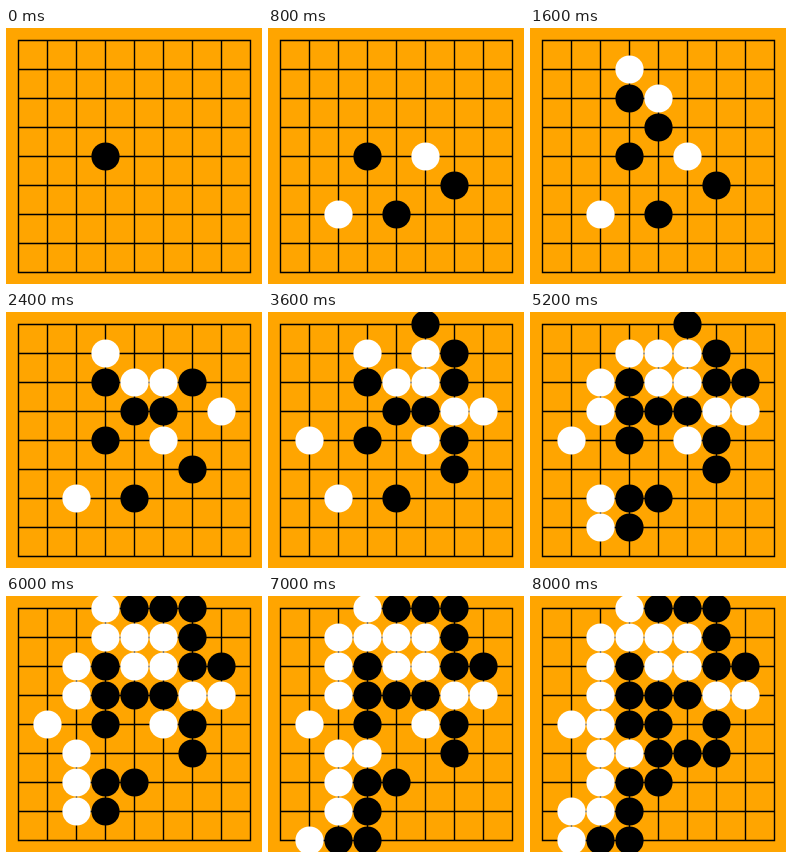
Write an HTML page with a canvas that moves like this. It is 256x256 px and loops after 8200 ms.

```html
<!DOCTYPE html>
<html lang="en">
<head>
<meta charset="utf-8">
<title>Go game</title>
<style>
  html, body { margin: 0; width: 100%; height: 100%; overflow: hidden; background: #ffa500; }
  canvas { display: block; }
</style>
</head>
<body>
<canvas id="board" width="256" height="256"></canvas>
<script>
const ctx = document.getElementById('board').getContext('2d');
const SIZE = 9, CELL = 29, EDGE = 12.5, STEP = 200;
const LINE = 1.4, RADIUS = 14.1;

// The game record: column then row of each move, black first.
const moves = ('34 54 46 26 65 42 32 31 43 52 53 73 62 63 64 51 61 14 50 41 72 ' +
  '22 33 23 36 27 37 25 40 30 60 21 28 18 38 35 45 24 44 17 55').split(' ');

const at = n => EDGE + CELL * n;
const onBoard = n => n >= 0 && n < SIZE;

function neighbours(point) {
  const [x, y] = [...point].map(Number);
  return [[x + 1, y], [x - 1, y], [x, y + 1], [x, y - 1]]
    .filter(p => p.every(onBoard)).map(p => p.join(''));
}

// Removes the group at a point if it has no free neighbour left.
function capture(stones, start) {
  const color = stones.get(start);
  const group = new Set([start]);
  for (const point of group) {
    for (const next of neighbours(point)) {
      if (!stones.has(next)) return;
      if (stones.get(next) === color) group.add(next);
    }
  }
  group.forEach(point => stones.delete(point));
}

function play(turn) {
  const stones = new Map();
  moves.slice(0, turn + 1).forEach((move, i) => {
    const color = i % 2 ? '#fff' : '#000';
    stones.set(move, color);
    for (const next of neighbours(move)) {
      if (stones.has(next) && stones.get(next) !== color) capture(stones, next);
    }
  });
  return stones;
}

function drawGrid() {
  ctx.fillStyle = '#ffa500';
  ctx.fillRect(0, 0, 256, 256);
  ctx.lineWidth = LINE;
  ctx.lineCap = 'square';
  ctx.beginPath();
  for (let i = 0; i < SIZE; i++) {
    ctx.moveTo(at(i), at(0));
    ctx.lineTo(at(i), at(SIZE - 1));
    ctx.moveTo(at(0), at(i));
    ctx.lineTo(at(SIZE - 1), at(i));
  }
  ctx.stroke();
}

function drawStone(color, [col, row]) {
  ctx.fillStyle = color;
  ctx.beginPath();
  ctx.arc(at(+col), at(+row), RADIUS, 0, 2 * Math.PI);
  ctx.fill();
}

function draw() {
  drawGrid();
  play(Math.floor(performance.now() / STEP) % moves.length).forEach(drawStone);
  requestAnimationFrame(draw);
}
draw();
</script>
</body>
</html>
```
